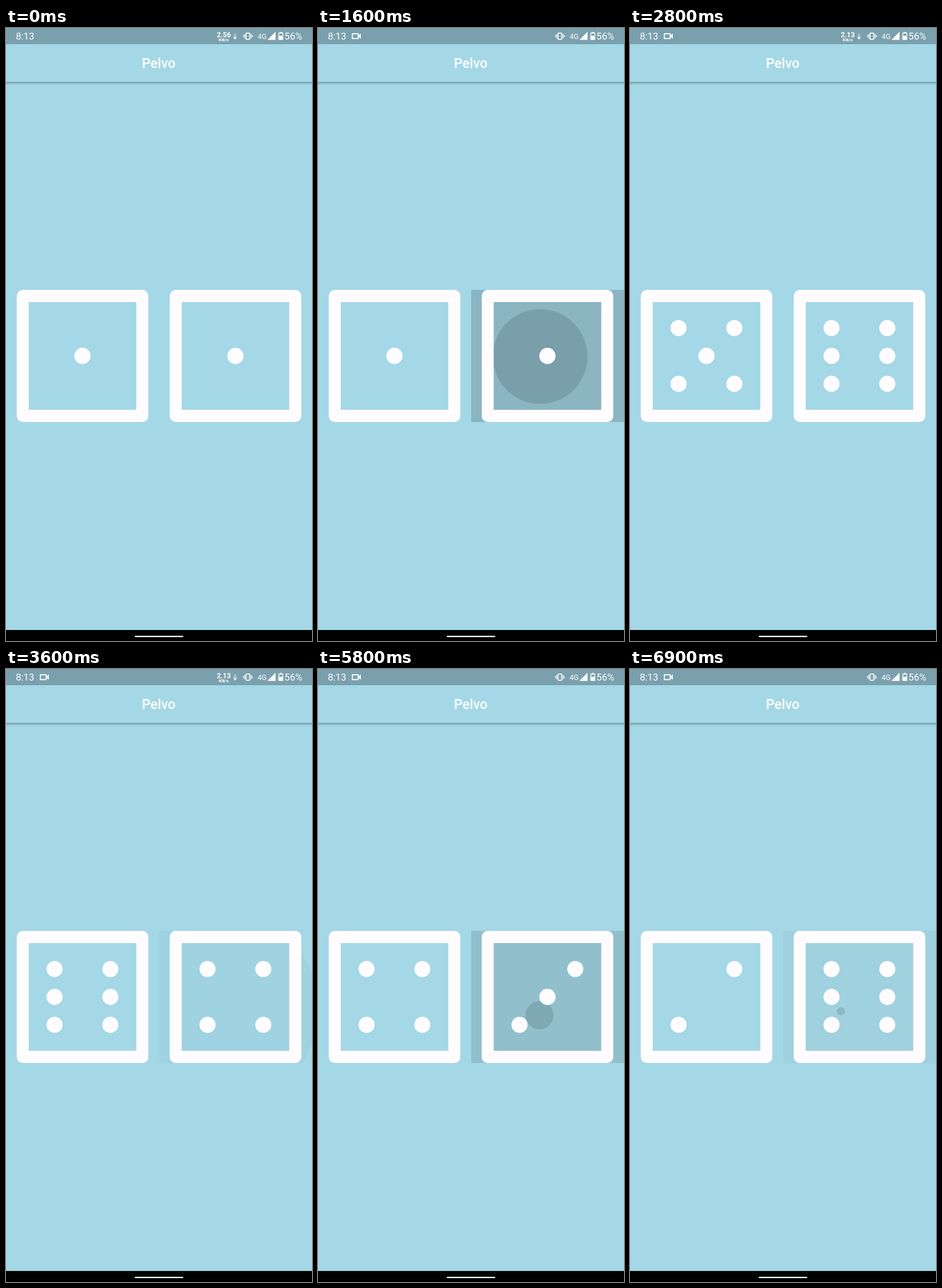
Recreate the animation shown at these times as an HTML page with a canvas. Size 529 px wide and 1058 px high, loop 7000 ms.

```html
<!DOCTYPE html>
<html lang="en">
<head>
<meta charset="utf-8">
<title>Dice roller</title>
<style>
  html, body { margin: 0; width: 100%; height: 100%; overflow: hidden; background: #a4d8e6; }
  canvas { display: block; width: 100vw; height: 100vh; }
</style>
</head>
<body>
<canvas id="stage" width="529" height="1058"></canvas>
<script>
const ctx = document.getElementById('stage').getContext('2d');
const LOOP = 7000, STEP = 100;
const SKY = '#a4d8e6', WHITE = '#fffcff';
const BUTTON = { x: 264.5, y: 452, w: 265, h: 228 };

// Each tap: press and release time, position, dice shown after the release.
const taps = [
  { down: 1130, up: 1650, x: 384, y: 567, dice: [6, 2] },
  { down: 2470, up: 2580, x: 380, y: 590, dice: [5, 6] },
  { down: 3290, up: 3440, x: 366, y: 587, dice: [6, 4] },
  { down: 4170, up: 4335, x: 378, y: 577, dice: [4, 3] },
  { down: 5660, up: 6150, x: 383, y: 597.5, dice: [2, 6] },
  { down: 6860, up: LOOP, x: 364.5, y: 591, dice: [1, 1] },
];

const clamp = v => Math.max(0, Math.min(1, v));

function rect(x, y, w, h, color) {
  ctx.fillStyle = color;
  ctx.fillRect(x, y, w, h);
}

function shape(color, build, rule) {
  ctx.fillStyle = color;
  ctx.beginPath();
  build();
  ctx.fill(rule || 'nonzero');
}

function circle(x, y, r, color) {
  shape(color, () => ctx.arc(x, y, r, 0, 7));
}

function polygon(color, ...points) {
  shape(color, () => points.forEach(p => ctx.lineTo(...p)));
}

function text(label, x, y, size, weight = 400, align = 'left') {
  ctx.font = `${weight} ${size}px Roboto, sans-serif`;
  ctx.textAlign = align;
  ctx.fillStyle = '#fff';
  ctx.fillText(label, x, y);
}

function drawAppBar() {
  ctx.save();
  ctx.shadowColor = 'rgba(0,0,0,.42)';
  ctx.shadowBlur = 5;
  ctx.shadowOffsetY = 1.5;
  rect(-10, 28, 549, 65, SKY);
  ctx.restore();
  text('Pelvo', 264, 69, 23.4, 500, 'center');
}

function drawCamera(opacity) {
  ctx.globalAlpha = opacity;
  ctx.strokeStyle = '#fff';
  ctx.lineWidth = 1.8;
  ctx.strokeRect(59.4, 9.9, 10, 8.4);
  polygon('#fff', [70, 13], [74, 9.6], [74, 18.6], [70, 15.2]);
  ctx.globalAlpha = 1;
}

function drawSpeed(value) {
  text(value, 376.5, 16, 12, 700, 'center');
  text('KB/s', 376.5, 23, 8, 700, 'center');
  polygon('rgba(255,255,255,.4)', [393, 13.5], [396, 8.5], [399, 13.5]);
  polygon('#fff', [393, 15], [399, 15], [396, 20.2]);
}

function drawStatusBar(t) {
  rect(0, 0, 529, 28, '#7ba0ad');
  text('8:13', 17, 20, 16.5);
  if (t >= 600) drawCamera(t < 700 ? 0.5 : 1);
  if (t < 900) drawSpeed('2.56');
  else if (t >= 2800 && t < 3900) drawSpeed('2.13');

  // vibrate mode
  ctx.strokeStyle = '#fff';
  ctx.lineWidth = 1.5;
  ctx.strokeRect(415.2, 8.7, 6, 10.8);
  for (const [x, h] of [[410, 4], [412.2, 8], [422.8, 8], [425, 4]])
    rect(x, 14 - h / 2, 1.4, h, '#fff');

  text('4G', 435, 19, 12.4);
  polygon('#fff', [452, 20.5], [466, 20.5], [466, 6.5]);

  // battery
  rect(473, 6.8, 4, 2, '#fff');
  shape('#fff', () => {
    ctx.roundRect(470.8, 8, 8.4, 12.6, 1);
    ctx.rect(472.2, 9.6, 5.6, 4);
  }, 'evenodd');
  text('56%', 512, 20, 16.5, 400, 'right');
}

function drawRipple(tap, t) {
  const held = Math.min(t, tap.up) - tap.down;
  const released = Math.max(0, t - tap.up);
  const highlight = 0.16 * clamp(clamp(held / 200) - released / 200);
  const splash = 0.12 * clamp(1 - released / 200);
  const radius = Math.min(174, held * 0.174 + released * 1.29);
  if (held <= 0 || highlight + splash <= 0) return;

  ctx.save();
  ctx.beginPath();
  ctx.roundRect(BUTTON.x, BUTTON.y, BUTTON.w, BUTTON.h, [2.5, 0, 0, 2.5]);
  ctx.clip();
  rect(BUTTON.x, BUTTON.y, BUTTON.w, BUTTON.h, `rgba(0,0,0,${highlight})`);
  circle(tap.x, tap.y, radius, `rgba(0,0,0,${splash})`);
  ctx.restore();
}

function drawDie(x, value) {
  shape(WHITE, () => {
    ctx.roundRect(x, 452, 227.5, 228, 10.5);
    ctx.rect(x + 20.7, 473, 186, 186);
  }, 'evenodd');
  const pip = (col, row) => {
    for (const side of [1, -1])
      circle(x + 113.6 + side * col * 48.2, 566 + side * row * 48.2, 13.9, WHITE);
  };
  if (value % 2) pip(0, 0);
  if (value > 1) pip(1, -1);
  if (value > 3) pip(1, 1);
  if (value === 6) pip(1, 0);
}

function draw(t) {
  rect(0, 0, 529, 1058, SKY);
  drawAppBar();
  drawStatusBar(t);
  taps.forEach(tap => drawRipple(tap, t));

  const rolled = taps.filter(tap => tap.up <= t).pop();
  const [left, right] = rolled ? rolled.dice : [1, 1];
  drawDie(18.6, left);
  drawDie(283, right);

  rect(0, 1039, 529, 19, '#000');
  shape('#fff', () => ctx.roundRect(222.5, 1049, 84, 2.2, 1.1));
}

function tick() {
  const t = performance.now() % LOOP;
  draw(Math.floor(t / STEP) * STEP);
  requestAnimationFrame(tick);
}
tick();
</script>
</body>
</html>
```
